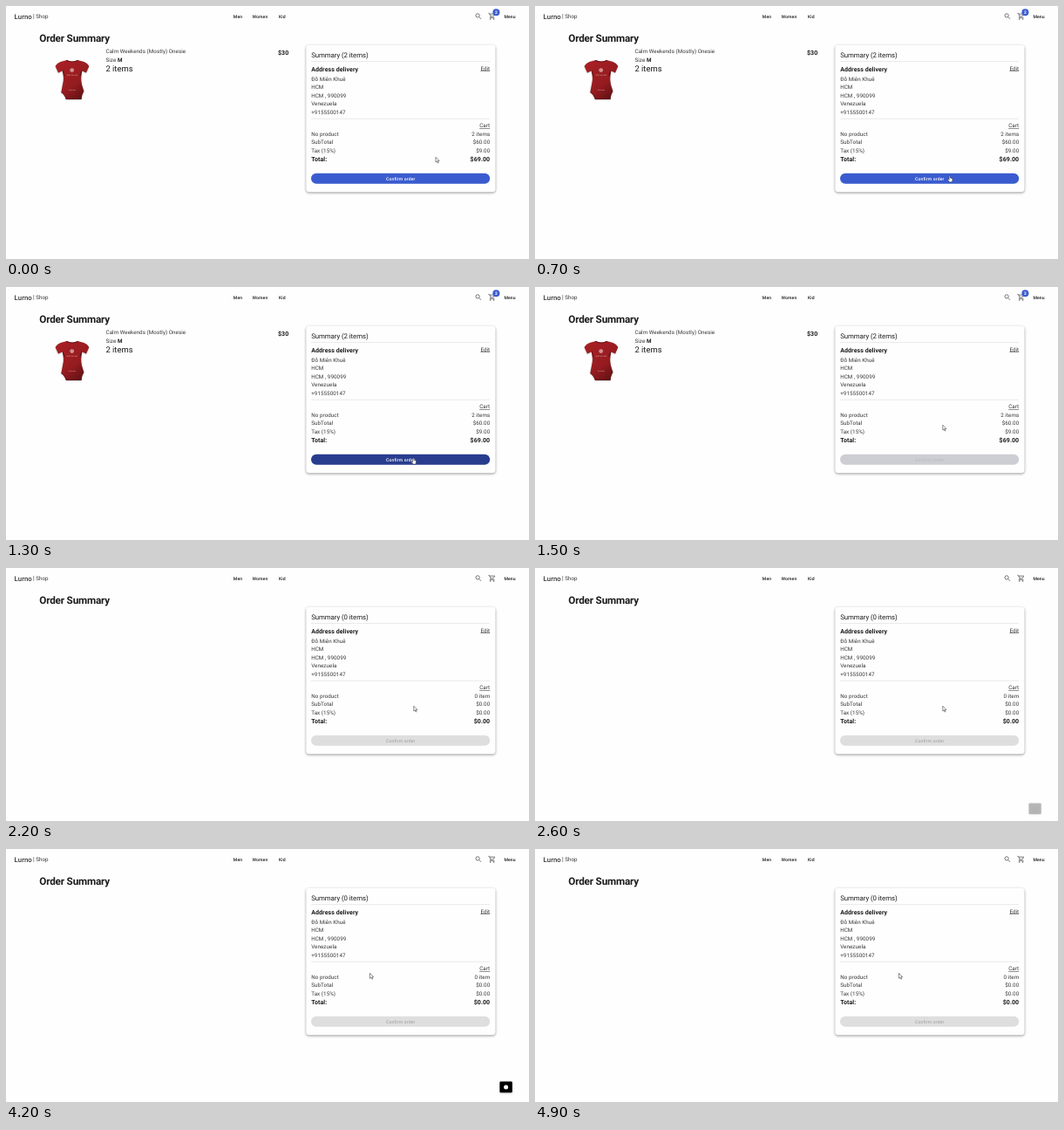
These frames come from a looping animation (600x290 px, 5 s). An HTML page with a canvas:

```html
<!DOCTYPE html>
<html lang="en">
<head>
<meta charset="utf-8">
<title>Order Summary</title>
<style>
  html, body { margin: 0; width: 100%; height: 100%; overflow: hidden; background: #fefefe; }
  canvas { display: block; width: 600px; height: 290px; }
</style>
</head>
<body>
<canvas id="stage"></canvas>
<script>
const W = 600, H = 290, LOOP = 5000, STEP = 100;
const S = W / 1536; // the page is laid out 1536 px wide
const INK = '#1c1c1c', SOFT = '#363636', BLUE = '#3a5ccf';

const canvas = document.getElementById('stage');
const dpr = window.devicePixelRatio || 1;
canvas.width = W * dpr;
canvas.height = H * dpr;
const ctx = canvas.getContext('2d');

// Piecewise linear track of [time, ...values]
function track(keys, t) {
  let i = 0;
  while (i < keys.length - 1 && t >= keys[i + 1][0]) i++;
  const a = keys[i], b = keys[i + 1];
  if (!b || t <= a[0]) return a.slice(1);
  const p = (t - a[0]) / (b[0] - a[0]);
  return a.slice(1).map((v, k) => v + (b[k + 1] - v) * p);
}

const rgb = c => `rgb(${c.map(Math.round).join()})`;

const POINTER = [
  [0, 493, 173.2], [200, 493, 173.2], [700, 475.7, 194.7], [900, 467.3, 196],
  [1300, 467.3, 196], [1500, 467.8, 158.2], [2600, 467.8, 158.2], [3100, 417.5, 142.4]
];
const BUTTON = [
  [0, 58, 92, 207], [700, 58, 92, 207], [800, 50, 78, 176], [1000, 40, 61, 142],
  [1300, 40, 61, 142], [1400, 128, 136, 176], [1500, 205, 205, 212], [1700, 222, 222, 222]
];
const LABEL = [
  [0, 255, 255, 255], [1300, 255, 255, 255], [1400, 215, 215, 222],
  [1500, 188, 188, 195], [1700, 168, 168, 168]
];
const BADGE = [[0, 1], [2000, 1], [2200, 0]];
const TOAST = [[0, 0], [2500, 0], [2600, 0.25], [2700, 1], [4400, 1], [4500, 0.3], [4600, 0]];

function text(str, x, y, size = 16, o = {}) {
  const { weight = 400, align = 'left', space = 0.0094, line = false } = o;
  const color = o.color || (weight > 400 || size > 16 ? INK : SOFT);
  ctx.save();
  ctx.translate(x, y);
  ctx.scale(S, S);
  ctx.font = `${weight} ${size}px Roboto, sans-serif`;
  ctx.letterSpacing = space * size + 'px';
  ctx.textRendering = 'geometricPrecision';
  ctx.textAlign = align;
  ctx.fillStyle = color;
  ctx.fillText(str, 0, 0);
  if (line) {
    const w = ctx.measureText(str).width;
    ctx.fillRect(-w, 2, w, 1.4);
  }
  ctx.restore();
}

function box(x, y, w, h, r, fill) {
  ctx.fillStyle = fill;
  ctx.beginPath();
  ctx.roundRect(x, y, w, h, r);
  ctx.fill();
}

function disc(x, y, r, fill) {
  ctx.fillStyle = fill;
  ctx.beginPath();
  ctx.arc(x, y, r, 0, 7);
  ctx.fill();
}

function shadow(color, blur, dy) {
  ctx.shadowColor = color;
  ctx.shadowBlur = blur * dpr;
  ctx.shadowOffsetY = dy * dpr;
}

function strokeIcon(x, y, path) {
  ctx.save();
  ctx.strokeStyle = '#555';
  ctx.lineWidth = 2;
  ctx.translate(x, y);
  ctx.scale(S, S);
  ctx.stroke(new Path2D(path));
  ctx.restore();
}

function drawIcons() {
  strokeIcon(537.4, 7.2, 'M15 9.5A5.5 5.5 0 1 1 4 9.5A5.5 5.5 0 1 1 15 9.5M13.5 13.5L19.7 19.7');
  strokeIcon(553, 7.2, 'M1 3H3.7L7.9 12H15.6L20 5H4.7M7.9 12L6 16H19');
  disc(555.7, 15, 0.8, '#555');
  disc(559.6, 15, 0.8, '#555');
}

function drawHeader(t) {
  const nav = { weight: 500, space: 0.0286 };
  text('Lurno', 9.5, 14.5, 20, { weight: 500, space: 0.0075, color: SOFT });
  text('|', 31, 14.4, 18, { color: SOFT });
  text('Shop', 34.2, 14.3);
  text('Men', 260.8, 13.7, 13, nav);
  text('Women', 282.4, 13.7, 13, nav);
  text('Kid', 312.9, 13.7, 13, nav);
  text('Menu', 571.4, 13.7, 13, nav);
  drawIcons();
  const [size] = track(BADGE, t);
  if (size <= 0) return;
  ctx.save();
  ctx.translate(562.4, 7.2);
  ctx.scale(size, size);
  disc(0, 0, 4, BLUE);
  text('2', 0, 1.7, 12.5, { weight: 700, color: '#fff', align: 'center' });
  ctx.restore();
}

function drawOnesie() {
  const body = new Path2D('M70 62Q76 65 82 62L89.5 64Q93.5 65.5 95.3 69L92 76.5L87.3 74.3' +
    'Q85.3 83 87 90L89.3 97.5Q87 101 86.5 107L69 107Q67 101 63.3 99L65 90' +
    'Q67 83 64.8 74.3L60 76.5L56.6 69Q58.5 65.5 62.5 64Z');
  const cloth = ctx.createLinearGradient(60, 66, 92, 104);
  cloth.addColorStop(0, '#a81f24');
  cloth.addColorStop(0.6, '#951c20');
  cloth.addColorStop(1, '#5c1013');
  ctx.save();
  shadow('rgba(0,0,0,.35)', 1.5, 0.5);
  ctx.fillStyle = cloth;
  ctx.fill(body);
  ctx.restore();

  ctx.save();
  ctx.clip(body);
  ctx.strokeStyle = '#5a1014';
  ctx.lineWidth = 1.2;
  ctx.stroke(new Path2D('M69 62Q76 66 83 62M63 99Q67 101 69 107H87Q87 101 90 97M64.8 74L67 80M87.3 74L85 80'));
  ctx.restore();

  disc(75.7, 73.6, 2.4, '#cf9092');
  const print = { color: '#d9a6a8', align: 'center', weight: 500 };
  text('SOFT ALL DAY', 75.9, 80, 5, print);
  text('EVERY DAY', 75.9, 97, 4, print);
}

function drawProduct() {
  drawOnesie();
  text('Calm Weekends (Mostly) Onesie', 114.5, 54.1);
  text('Size', 114.5, 63.5);
  text('M', 127.9, 63.5, 16, { weight: 700 });
  text('2 items', 114.5, 75.1, 24, { space: 0 });
  text('$30', 312, 55.7, 18, { weight: 700 });
}

function row(name, value, y, size = 16, weight = 400) {
  text(name, 350.2, y, size, { weight });
  text(value, 555.2, y, size, { weight, align: 'right' });
}

function drawCard(t, paid) {
  ctx.save();
  shadow('rgba(0,0,0,.42)', 3, 1);
  box(344.3, 44.7, 217.2, 168.5, 3.6, '#fefefe');
  ctx.restore();

  text(`Summary (${paid ? 0 : 2} items)`, 350.2, 58.5, 20, { space: -0.0083 });
  ctx.fillStyle = '#e4e4e4';
  ctx.fillRect(350, 63.3, 205, 0.8);
  ctx.fillRect(350, 128.8, 205, 0.8);

  const link = { align: 'right', line: true };
  text('Address delivery', 350.2, 75.3, 18, { weight: 700 });
  text('Edit', 555.2, 73.6, 16, link);
  ['Đỗ Miên Khuê', 'HCM', 'HCM , 990099', 'Venezuela', '+9155500147']
    .forEach((s, i) => text(s, 350.2, 86 + i * 24 * S));

  text('Cart', 555.2, 139.4, 16, link);
  row('No product', paid ? '0 item' : '2 items', 148.8);
  row('SubTotal', paid ? '$0.00' : '$60.00', 158.2);
  row('Tax (15%)', paid ? '$0.00' : '$9.00', 167.6);
  row('Total:', paid ? '$0.00' : '$69.00', 178.2, 18, 700);

  box(350, 191.8, 205.2, 12, 6, rgb(track(BUTTON, t)));
  text('Confirm order', 452.7, 199.6, 13,
    { weight: 500, color: rgb(track(LABEL, t)), align: 'center', space: 0.0286 });
}

// Small status box that slides up while it fades in
function drawToast(t) {
  const [p] = track(TOAST, t);
  if (p <= 0) return;
  const y = 266.6 + (1 - p) * 10 * S;
  ctx.save();
  ctx.globalAlpha = p;
  shadow('rgba(0,0,0,.2)', 3, 0.8);
  box(566.4, y, 14.4, 12.6, 1.2, '#000');
  ctx.restore();
  if (p === 1) disc(573.6, y + 6.3, 2.5, '#fff');
}

function drawPointer(t) {
  const [x, y] = track(POINTER, t);
  const hand = y > 192;
  const path = new Path2D(hand
    ? 'M-1.5 1Q0 -1 1.5 1V6L7 7.5Q9 8 8.5 11L7 18H-1L-6 11Q-6 8.5 -3.5 10L-1.5 12Z'
    : 'M0 0V15L3.6 11.7L6.1 17.5L8.4 16.4L6 11H10.6Z');
  ctx.save();
  ctx.translate(x, y);
  ctx.scale(S, S);
  ctx.lineWidth = 1.4;
  ctx.lineJoin = 'round';
  ctx.strokeStyle = '#333';
  ctx.fillStyle = '#fff';
  ctx.fill(path);
  ctx.stroke(path);
  ctx.restore();
}

function draw(now) {
  const t = Math.floor((now % LOOP) / STEP) * STEP;
  const paid = t >= 2000;
  ctx.setTransform(dpr, 0, 0, dpr, 0, 0);
  ctx.fillStyle = '#fefefe';
  ctx.fillRect(0, 0, W, H);
  drawHeader(t);
  text('Order Summary', 38.3, 41.1, 30, { weight: 700, space: -0.0156 });
  if (!paid) drawProduct();
  drawCard(t, paid);
  drawToast(t);
  drawPointer(t);
}

const start = performance.now();
function loop() {
  draw(performance.now() - start);
  requestAnimationFrame(loop);
}
loop();
</script>
</body>
</html>
```
